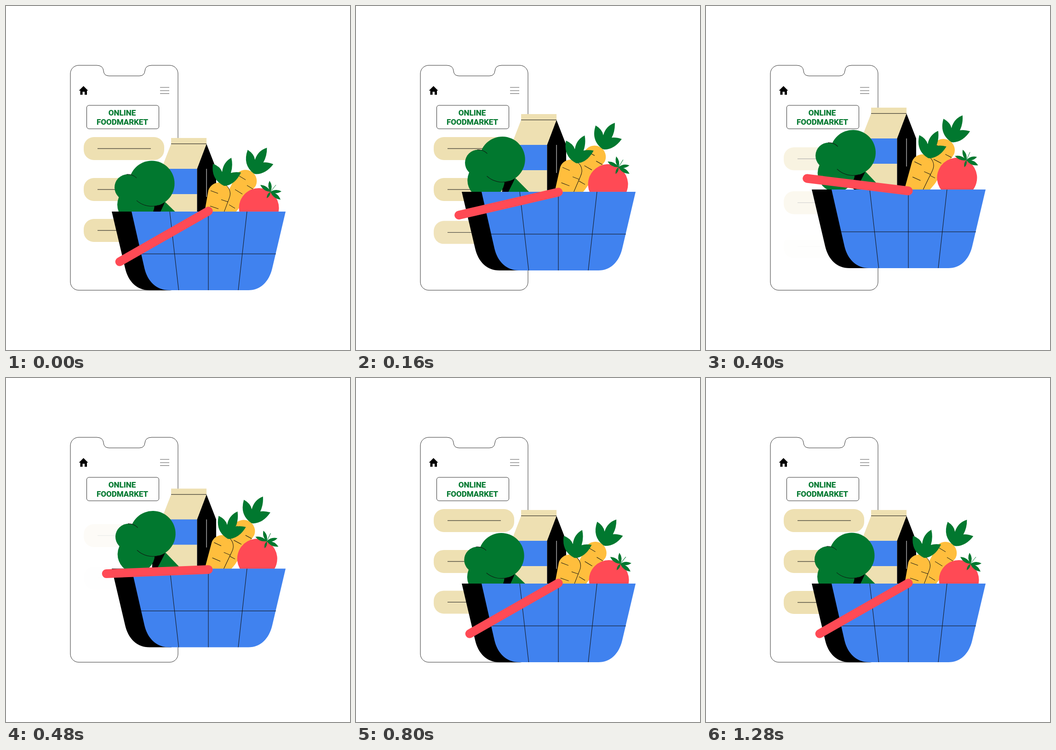
Write an HTML page that moves like this. It is 748 px wide and 748 px high and loops after 1360 ms.

```html
<!DOCTYPE html>
<html lang="en">
<head>
<meta charset="utf-8">
<title>Online food market</title>
<style>
  html, body { margin: 0; width: 100%; height: 100%; overflow: hidden; background: #fff; }
  svg { display: block; width: 100%; height: 100%; }
  .line { fill: none; stroke: #111; stroke-width: 1; }
  #phone .line { stroke: #333; }
  .beige { fill: #eee0b2; }
  .blue { fill: #4082ef; }
  .green { fill: #01782f; }
  .yellow { fill: #ffbe3d; }
  .red { fill: #ff4a55; }
  text { font: 700 17px Roboto, sans-serif; text-anchor: middle; stroke: #01782f; stroke-width: .25; }
</style>
</head>
<body>
<svg viewBox="0 0 748 748">
  <defs>
    <g id="pill">
      <rect class="beige" x="169" y="285" width="175" height="50" rx="22"/>
      <path class="line" d="M199 310H315"/>
    </g>
    <path id="tops" class="green" d="M-26 -48Q-10 -42 -6 -30Q-4 -51 14 -61Q18 -44 13 -28Q22 -31 35 -29Q23 -4 2 0H-2Q-31 -14 -26 -48Z"/>
  </defs>

  <g id="phone">
    <path class="line" d="M158 129H197Q211 129 212 141Q213 152 224 152H290Q301 152 302 141Q303 129 317 129H356A18 18 0 0 1 374 147V600A18 18 0 0 1 356 618H158A18 18 0 0 1 140 600V147A18 18 0 0 1 158 129Z"/>
    <path d="M168.500 174L178.500 184H176V193H171V186.500H166.500V193H161.500V184H158.500Z"/>
    <path class="line" style="stroke:#555" d="M335 177H355M335 184H355M335 190.500H355"/>
    <rect class="line" x="175.500" y="216" width="157" height="51" rx="5"/>
    <text class="green" x="252.500" y="237.500">ONLINE</text>
    <text class="green" x="253" y="258">FOODMARKET</text>
  </g>

  <g id="pills"></g>

  <g id="milk">
    <path class="beige" d="M359 287H436V300L415.500 354V480H338V354L359 300Z"/>
    <path class="blue" d="M338 354H415.500V409H338Z"/>
    <path d="M436 300L457 354V480H415.500V354Z"/>
    <path class="line" d="M359 299.700H436"/>
    <path class="line" style="stroke:#fff" d="M436 354V415"/>
  </g>

  <g id="backCarrot">
    <path class="yellow" d="M502 365A24.500 24.500 0 0 1 543 391L497 452L470 480L460 450Z"/>
    <use href="#tops" transform="translate(541 365) rotate(12)"/>
    <path class="line" d="M506 369L521 378M498 399L514 409M524 390L537 398M485 432L498 440"/>
  </g>

  <g id="frontCarrot">
    <path class="yellow" d="M440 401A24.300 24.300 0 0 1 487.500 408Q487.500 413 485 419L464 475H427Z"/>
    <path class="line" d="M466 384.500A24.300 24.300 0 0 1 487.500 408Q487.500 413 485 419L464 475"/>
    <use href="#tops" transform="translate(476 391)"/>
    <path class="line" d="M445 401.500L461 407.500M468 421L483 426M444 435L462 441"/>
  </g>

  <g id="tomato">
    <circle class="red" cx="550" cy="439.500" r="43.500"/>
    <g id="calyx">
      <path id="sepals" class="green" transform="translate(575 404)"/>
      <path class="line" style="stroke:#01782f" d="M575 404L587 389"/>
    </g>
  </g>

  <g id="broccoli">
    <path d="M318 425L346 426L328 470L318 462Z"/>
    <path class="green" d="M346 426L384 463L324 472Z"/>
    <g class="green">
      <circle cx="282.500" cy="432" r="40.500"/>
      <circle cx="264.500" cy="394.500" r="28.500"/>
      <circle cx="317" cy="386" r="49.500"/>
      <path d="M264 370H300V425H264Z"/>
    </g>
    <path class="line" d="M284 423A49.500 49.500 0 0 0 332 433M262 366A28.500 28.500 0 0 1 284 374"/>
  </g>

  <g id="basket">
    <path d="M230 447H300L360 618H312C285 618 266 600 259 570Z"/>
    <path class="blue" d="M273 447H608L579 570C572 600 553 618 527 618H355C328 618 308 600 301 570Z"/>
    <path class="line" d="M294 539H587M356 447L375.500 618M440 447V618M524 447L505 618"/>
  </g>

  <path id="handle" d="M0 0H-222" fill="none" stroke="#ff4a55" stroke-width="19" stroke-linecap="round"/>
</svg>

<script>
const LOOP = 1360, STEP = 80;
const $ = id => document.getElementById(id);

// One value per step; a track rests at its last value.
const lift = [0, -22, -43, -56, -58, -48, -32.5, -17, -5.5, 0];
const hop = [0, -1.8, -9, -19, -21, -18, -14, -7, -1.5, 0];
const swing = [0, 0, 0.5, 1, 1.08, 1.03, 0.93, 0.4, 0];
const rebound = [0, 0, 0, 0, 0, 0, 0, 0, 0, 0.04, 0.13, 0.2, 0.19, 0.12, 0.07, 0.03, 0];
const handleAngle = [29.7, 29.7, 13, -7.8, -13, -7, 2.3, 16, 26.7, 29.7];
const at = (track, i) => track[Math.min(i, track.length - 1)];

const smooth = (t, start, length) => {
  const u = Math.min(1, Math.max(0, (t - start) / length));
  return u * u * (3 - 2 * u);
};

const leaf = (x, y, k) =>
  `M0 0Q${x / 2 - y * k} ${y / 2 + x * k} ${x} ${y}Q${x / 2 + y * k} ${y / 2 - x * k} 0 0Z`;

$('sepals').setAttribute('d',
  [[-2, -24], [-22, -15], [24, -1], [22, 17], [-8, 14]].map(([x, y]) => leaf(x, y, 0.3)).join(''));

const addPill = () => {
  const pill = document.createElementNS('http://www.w3.org/2000/svg', 'use');
  pill.setAttribute('href', '#pill');
  return $('pills').appendChild(pill);
};
const rows = [
  { y: 0, leave: 200, enter: 520 },
  { y: 89, leave: 155, enter: 571 },
  { y: 178, leave: 85, enter: 593 },
].map(row => ({ ...row, oldPill: addPill(), newPill: addPill() }));

const place = (id, x, y, angle = 0, px = 0, py = 0) =>
  $(id).setAttribute('transform', `translate(${x} ${y}) rotate(${angle} ${px} ${py})`);

const setPill = (pill, y, opacity) => {
  pill.setAttribute('transform', `translate(0 ${y})`);
  pill.setAttribute('opacity', opacity);
};

function draw(time) {
  const i = Math.floor((time % LOOP) / STEP);
  const t = i * STEP;
  const y = at(lift, i), goods = y + at(hop, i);
  const s = at(swing, i), r = at(rebound, i), tilt = s + r;
  const angle = at(handleAngle, i);

  for (const row of rows) {
    const out = smooth(t, row.leave, 345), into = smooth(t, row.enter, 240);
    setPill(row.oldPill, row.y + 36 * out, 1 - out);
    setPill(row.newPill, row.y - 12 * (1 - into), into);
  }
  place('milk', 0, goods);
  place('backCarrot', 0, goods, -4 * tilt, 500, 440);
  place('frontCarrot', 0, goods + 3 * s, 5.3 * tilt, 450, 488);
  place('tomato', -4 * s, goods, -7 * s - 2 * r, 550, 439.5);
  place('calyx', 0, 0, -7 * s, 575, 404);
  place('broccoli', 0, goods, 2.1 * s - 6 * r, 345, 450);
  place('basket', 0, y);
  place('handle', 440, 446 + y + (29.7 - angle) * 0.11, -angle);
}

function frame(now) {
  draw(now);
  requestAnimationFrame(frame);
}
draw(0);
requestAnimationFrame(frame);
</script>
</body>
</html>
```
